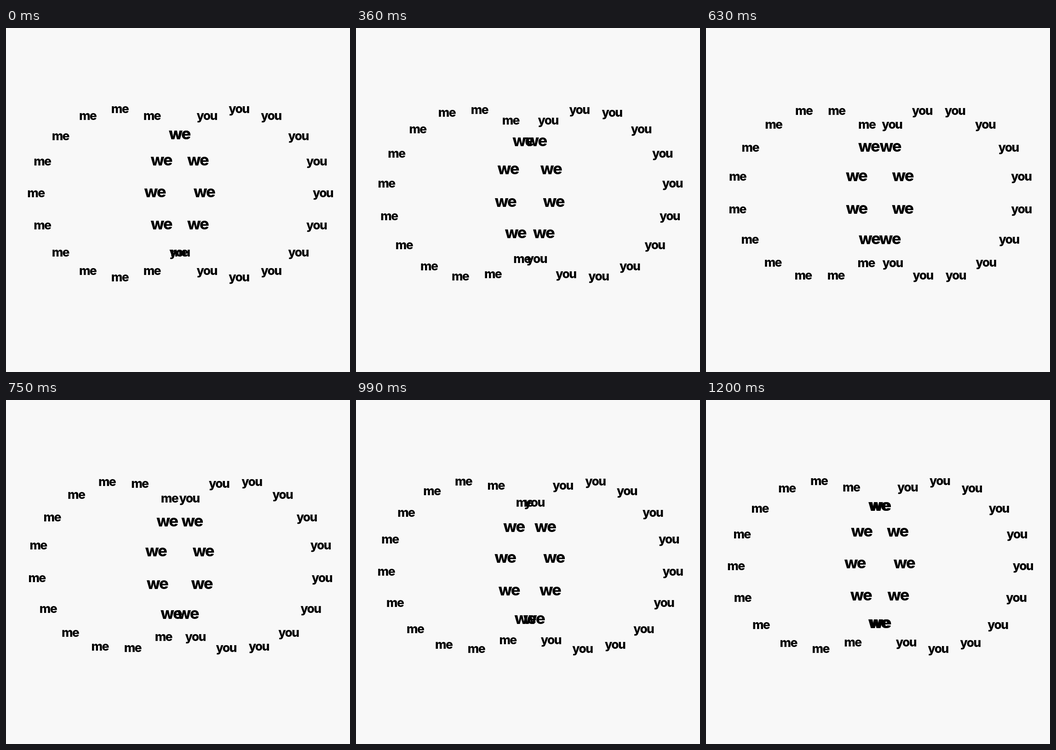
These frames come from a looping animation (748x748 px, 1230 ms). An HTML page with a canvas:

```html
<!DOCTYPE html>
<html lang="en">
<head>
<meta charset="utf-8">
<title>me, you, we</title>
<style>
  html, body { margin: 0; height: 100%; overflow: hidden; background: #f8f8f8; }
  canvas { display: block; }
</style>
</head>
<body>
<canvas id="stage" width="748" height="748"></canvas>
<script>
const ctx = document.getElementById('stage').getContext('2d');
const STEP_MS = 30, STEPS = 41, WORDS = 16;
const RADIUS = 182.6, CENTER_Y = 367.9;
const small = { font: '800 26.5px Inter, sans-serif', spacing: '-1.7px' };
const large = { font: '800 34.5px Inter, sans-serif', spacing: '-2.2px' };

// Centres the visible ink of a word on x, with its baseline on y.
function drawWord(word, style, x, y) {
  ctx.font = style.font;
  ctx.letterSpacing = style.spacing;
  const box = ctx.measureText(word);
  const middle = (box.actualBoundingBoxRight - box.actualBoundingBoxLeft) / 2;
  ctx.fillText(word, x - middle, y);
}

// side 1 turns clockwise, side -1 is its mirror image.
function drawRing(word, centerX, side, phase) {
  for (let i = 0; i < WORDS; i++) {
    const slot = i + phase;
    const angle = slot / WORDS * 2 * Math.PI;
    const across = Math.sin(angle), up = Math.cos(angle);
    // The ring is slightly flattened on its upper diagonals.
    const flat = up < 0 ? 0 : across < 0 ? 5 : 3;
    const x = centerX + side * RADIUS * across;
    const y = CENTER_Y - RADIUS * up + flat * Math.sin(2 * angle) ** 4;
    const shared = slot > 1.97 && slot < 6;
    drawWord(shared ? 'we' : word, shared ? large : small, x, y);
  }
}

function render() {
  const phase = Math.floor(performance.now() / STEP_MS) % STEPS / STEPS;
  ctx.fillStyle = '#f8f8f8';
  ctx.fillRect(0, 0, 748, 748);
  ctx.fillStyle = '#000';
  drawRing('me', 248.8, 1, phase);
  drawRing('you', 506.8, -1, phase);
  requestAnimationFrame(render);
}
render();
</script>
</body>
</html>
```
